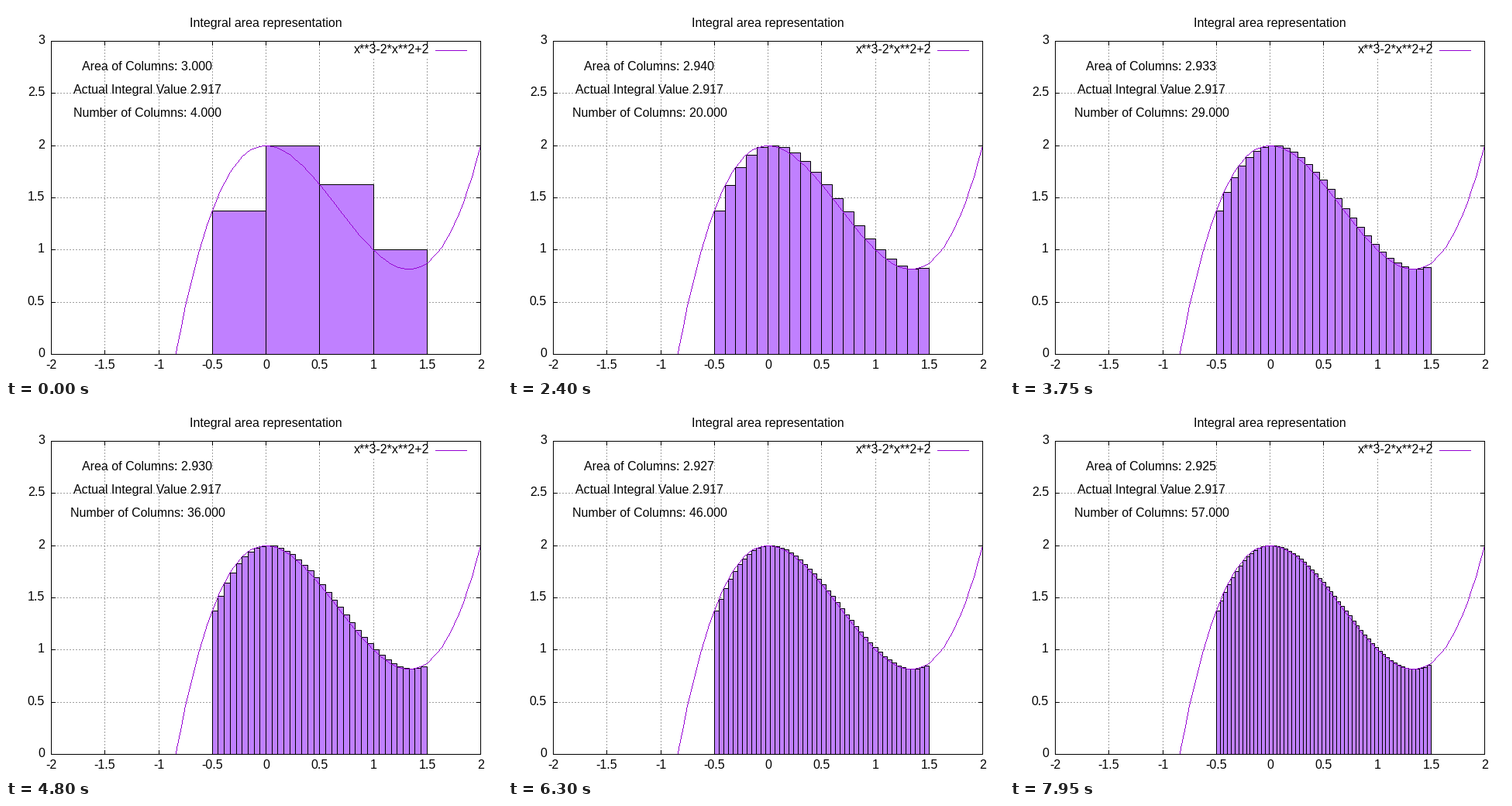
A matplotlib script that plays this animation: 640x480 px, repeating every 8 s.

```python
import numpy as np
import matplotlib.pyplot as plt
from matplotlib.animation import FuncAnimation
from matplotlib.collections import LineCollection, PolyCollection
from matplotlib.patches import Rectangle

W, H, DPI = 640, 480, 80
PX = 72 / DPI
LEFT, RIGHT, TOP, BOTTOM = 58, 612, 45, 449
KEY_LEFT, KEY_BOTTOM = 445, 66
TICK = 5.5
A, B = -0.5, 1.5
FRAME_MS, LOOP_MS, STEP_MS = 50, 8000, 150
FIRST_COUNT = 4
VIOLET, FILL, GREY = "#9400d3", "#c080ff", "#a0a0a0"

plt.rcParams.update({
    "font.family": "Liberation Sans",
    "font.size": 16 * PX,
    "text.hinting": "native",
    "text.hinting_factor": 8,
})


def f(x):
    return x**3 - 2 * x**2 + 2


def px(x):
    """Centre of the pixel column for a data x."""
    return np.floor(LEFT + (np.asarray(x) + 2) * (RIGHT - LEFT) / 4 + 0.5) + 0.5


def py(y):
    """Centre of the pixel row for a data y."""
    return np.floor(BOTTOM - np.asarray(y) * (BOTTOM - TOP) / 3 + 0.5) + 0.5


def trace(xs, ys):
    """Whole pixels along a polyline, one per step of its longer side."""
    cells = set()
    for xa, ya, xb, yb in zip(xs[:-1], ys[:-1], xs[1:], ys[1:]):
        steps = int(max(abs(xb - xa), abs(yb - ya))) + 1
        cols = np.floor(np.linspace(xa, xb, steps)).astype(int)
        rows = np.floor(np.linspace(ya, yb, steps)).astype(int)
        cells.update(zip(cols.tolist(), rows.tolist()))
    return sorted(cells)


fig = plt.figure(figsize=(W / DPI, H / DPI), dpi=DPI, facecolor="white")
ax = fig.add_axes([0, 0, 1, 1])
ax.set_xlim(0, W)
ax.set_ylim(H, 0)
ax.axis("off")


def lines(segments, color, zorder, style="solid"):
    ax.add_collection(LineCollection(
        segments, colors=color, linewidths=PX, linestyles=[style],
        snap=False, zorder=zorder), autolim=False)


def label(x, y, text, ha="center"):
    return ax.text(x, y, text, ha=ha, va="baseline", color="black", zorder=6)


x0, x1, y0, y1 = LEFT + 0.5, RIGHT + 0.5, BOTTOM + 0.5, TOP + 0.5

grid, ticks = [], []
for value in np.arange(-2, 2.1, 0.5):
    x = px(value)
    if -2 < value < 2:
        grid.append([(x, BOTTOM + 1), (x, KEY_BOTTOM if x > KEY_LEFT else TOP)])
    ticks += [[(x, y0), (x, y0 - TICK)], [(x, y1), (x, y1 + TICK)]]
    label(x, 468, f"{value:g}")
for value in np.arange(0, 3.1, 0.5):
    y = py(value)
    if 0 < value < 3:
        grid.append([(LEFT, y), (RIGHT + 1, y)])
    ticks += [[(x0, y), (x0 + TICK, y)], [(x1, y), (x1 - TICK, y)]]
    label(50, y + 3.5, f"{value:g}", "right")

lines(grid, GREY, 1, (0, (2, 2)))
lines(ticks, "black", 2)
ax.add_patch(Rectangle((x0, y1), x1 - x0, y0 - y1, fill=False, ec="black",
                       lw=PX, snap=False, zorder=5))

columns = PolyCollection([], facecolors=FILL, edgecolors="black",
                         linewidths=PX, joinstyle="miter", snap=False, zorder=3)
ax.add_collection(columns, autolim=False)

xs = np.linspace(-2, 2, 100)
ax.add_collection(PolyCollection(
    [[(c, r), (c + 1, r), (c + 1, r + 1), (c, r + 1)]
     for c, r in trace(px(xs), py(f(xs))) if r <= BOTTOM],
    facecolors=VIOLET, linewidths=0, snap=False, zorder=4), autolim=False)

label(335, 27, "Integral area representation")
label(546.5, 61, "x**3-2*x**2+2", "right")
lines([[(554, 57.5), (595, 57.5)]], VIOLET, 4)

integral = (B**4 - A**4) / 4 - 2 * (B**3 - A**3) / 3 + 2 * (B - A)
area_text = label(182.5, 83, "")
label(182.5, 113, f"Actual Integral Value {integral:.3f}")
count_text = label(182.5, 143, "")


def update(frame):
    count = FIRST_COUNT + frame * FRAME_MS // STEP_MS
    edges = np.linspace(A, B, count + 1)
    heights = f(edges[:-1])
    sides, tops = px(edges), py(heights)
    columns.set_verts([
        [(l, y0), (l, t), (r, t), (r, y0)]
        for l, r, t in zip(sides[:-1], sides[1:], tops)
    ])
    area = heights.sum() * (B - A) / count
    area_text.set_text(f"Area of Columns: {area:.3f}")
    count_text.set_text(f"Number of Columns: {count:.3f}")
    return columns, area_text, count_text


anim = FuncAnimation(fig, update, frames=LOOP_MS // FRAME_MS,
                     interval=FRAME_MS, repeat=True, repeat_delay=0)
plt.show()
```
